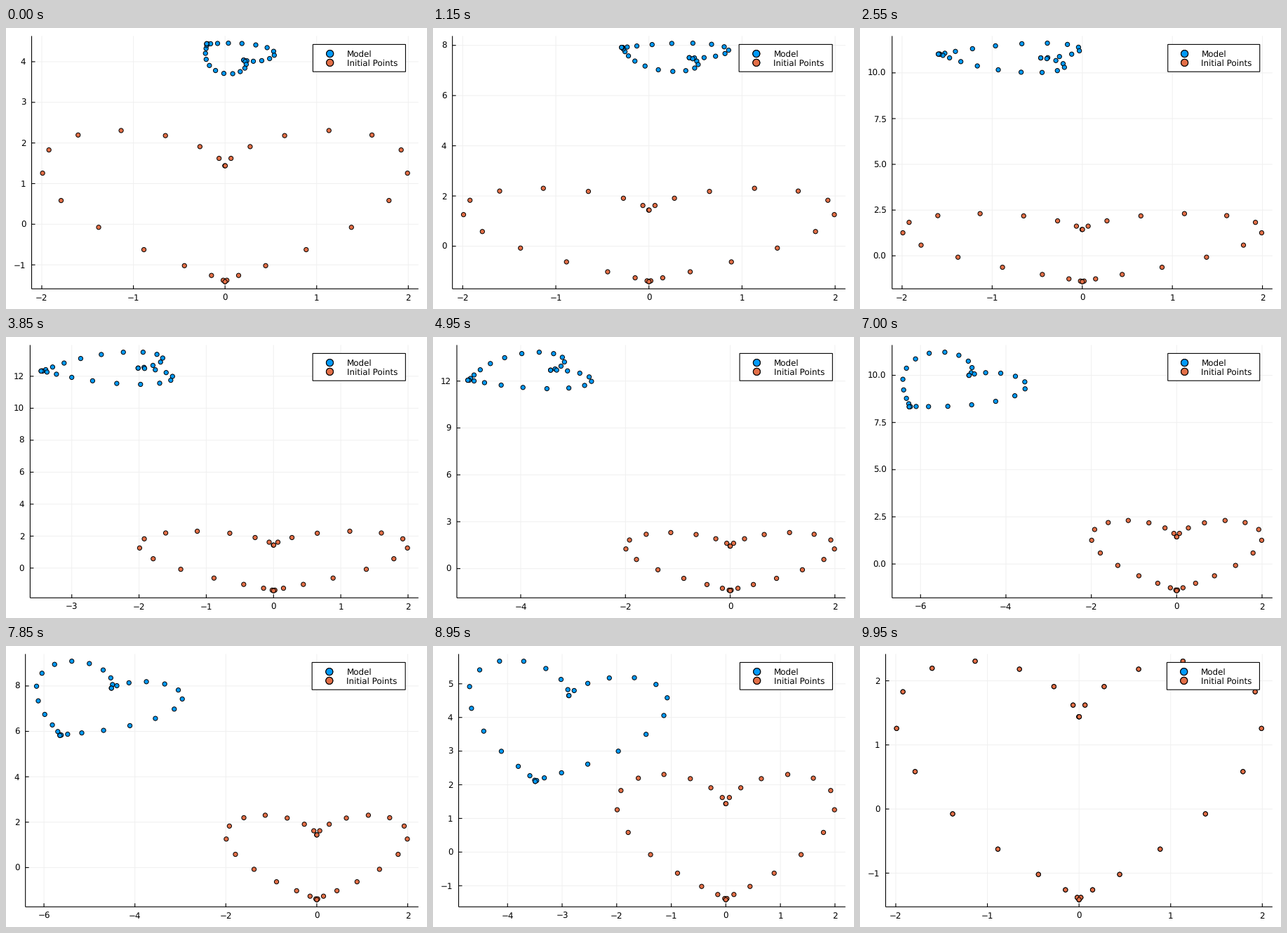
A matplotlib script for the animation above (10000 ms loop, 600 by 400 pixels).

```python
import numpy as np
import matplotlib.pyplot as plt
from matplotlib.animation import FuncAnimation
from matplotlib.patches import Rectangle
from matplotlib.textpath import TextPath

W, H, DPI = 600, 400, 100
FRAMES, INTERVAL = 200, 50
TOP, BOTTOM, RIGHT = 11.4, 371.3, 587.8
BLUE, ORANGE = "#009afa", "#e36f47"
EM = 11.9                       # font size in pixels
PX = 72 / DPI                   # points per pixel
STEPS = ((1, 1), (5, 0.9), (2, 0.7), (2.5, 0.5), (3, 0.2))

plt.rcParams["font.family"] = "DejaVu Sans"
plt.rcParams["text.hinting"] = "none"
fig = plt.figure(figsize=(W / DPI, H / DPI), dpi=DPI, facecolor="white")
ax = fig.add_axes([0, 0, 1, 1])

t = np.linspace(-np.pi, np.pi, 30)
c = np.cos(t)
heart = 2 * np.sin(t) ** 3 + 1j * np.sqrt(2) * (1 + 2 * c - c**2 - c**3)


def model(u):
    """Heart turned, grown and carried along an arc; u runs from 0 to 1."""
    turn = np.exp(1j * np.pi * (1.25 + 0.75 * u))
    lean = np.tan(np.pi / 8 * (3 * u - 1))
    arc = 20 / np.sqrt(3) * np.sin(np.pi * u) * (1 - 1j * lean)
    shift = -3 * (1 - u) * (1 + 1j) - arc
    return turn * ((0.2 + 0.8 * u) * heart + shift)


def limits(values):
    pad = 0.03 * np.ptp(values)
    return values.min() - pad, values.max() + pad


def ticks(lo, hi):
    """Choose the best spaced round ticks inside the limits."""
    span = hi - lo
    best, found = (-1, 0), None
    for power in (0.1, 1, 10):
        for q, nice in STEPS:
            step = q * power
            first, last = int(np.ceil(lo / step)), int(np.floor(hi / step))
            n = last - first + 1
            if not 4 <= n <= 8:
                continue
            score = (1 - abs(n - 5) / 5) / 4 + 0.5 * span / ((n - 1) * step)
            score += nice / 4 + (1 / 6 if first <= 0 <= last else 0)
            rank = (round(score, 6), step)
            if rank > best:
                best, found = rank, (step, np.arange(first, last + 1) * step)
    step, values = found
    digits = 0 if step == int(step) else 1
    return [(v, f"{v:.{digits}f}".replace("-", "\u2212")) for v in values]


def line(x, y, color="black", width=1.1, z=2):
    ax.plot(x, y, color=color, lw=width * PX, zorder=z, snap=False,
            solid_capstyle="butt")


def text(x, y, label, align, z=2):
    ax.text(x, y, label, fontsize=EM * PX, ha=align, va="baseline", zorder=z)


def dots(x, y, color, size, edge, z):
    sizes = np.full(len(x), (size * PX) ** 2)
    sizes[0] *= 1.0001          # unequal sizes keep subpixel positions
    ax.scatter(x, y, s=sizes, c=color, edgecolors="black",
               linewidths=edge * PX, zorder=z, snap=False)


def legend(width):
    right = RIGHT - width / 30
    left = right - 72.3 - 0.1083 * width
    ax.add_patch(Rectangle((left, 23.4), right - left, 38.8, fc="white",
                           ec="black", lw=1.1 * PX, zorder=6, snap=False))
    rows = (("Model", BLUE, 36.6), ("Initial Points", ORANGE, 49.4))
    for label, color, y in rows:
        mark = left + 0.044 * width
        dots([mark, mark], [y, y], color, 10, 1.1, 7)
        text(right - 0.0218 * width - 71.5, y + 4.6, label, "left", 7)


def draw(i):
    ax.clear()
    ax.set_xlim(0, W)
    ax.set_ylim(H, 0)
    ax.axis("off")

    moving = model(i / (FRAMES - 1))
    both = np.concatenate([moving, heart])
    x0, x1 = limits(both.real)
    y0, y1 = limits(both.imag)
    xticks, yticks = ticks(x0, x1), ticks(y0, y1)
    inks = [TextPath((0, 0), s, size=EM).get_extents().width
            for _, s in yticks]
    left = 21.35 + max(inks)
    width = RIGHT - left

    def px(x):
        return left + (x - x0) / (x1 - x0) * width

    def py(y):
        return BOTTOM - (y - y0) / (y1 - y0) * (BOTTOM - TOP)

    for v, label in xticks:
        x = px(v)
        line([x, x], [TOP, BOTTOM], "#f0f0f0", 1, 1)
        line([x, x], [BOTTOM, BOTTOM - 5])
        text(x, 388, label, "center")
    for v, label in yticks:
        y = py(v)
        line([left, RIGHT], [y, y], "#f0f0f0", 1, 1)
        line([left, left + 5], [y, y])
        text(left - 8.2, y + 4.4, label, "right")
    line([left, left], [TOP, BOTTOM])
    line([left, RIGHT], [BOTTOM, BOTTOM])

    dots(px(moving.real), py(moving.imag), BLUE, 6.2, 1, 4)
    dots(px(heart.real), py(heart.imag), ORANGE, 6.2, 1, 5)
    legend(width)
    return []


anim = FuncAnimation(fig, draw, frames=FRAMES, interval=INTERVAL,
                     init_func=lambda: [], repeat=True, repeat_delay=0)
plt.show()
```
